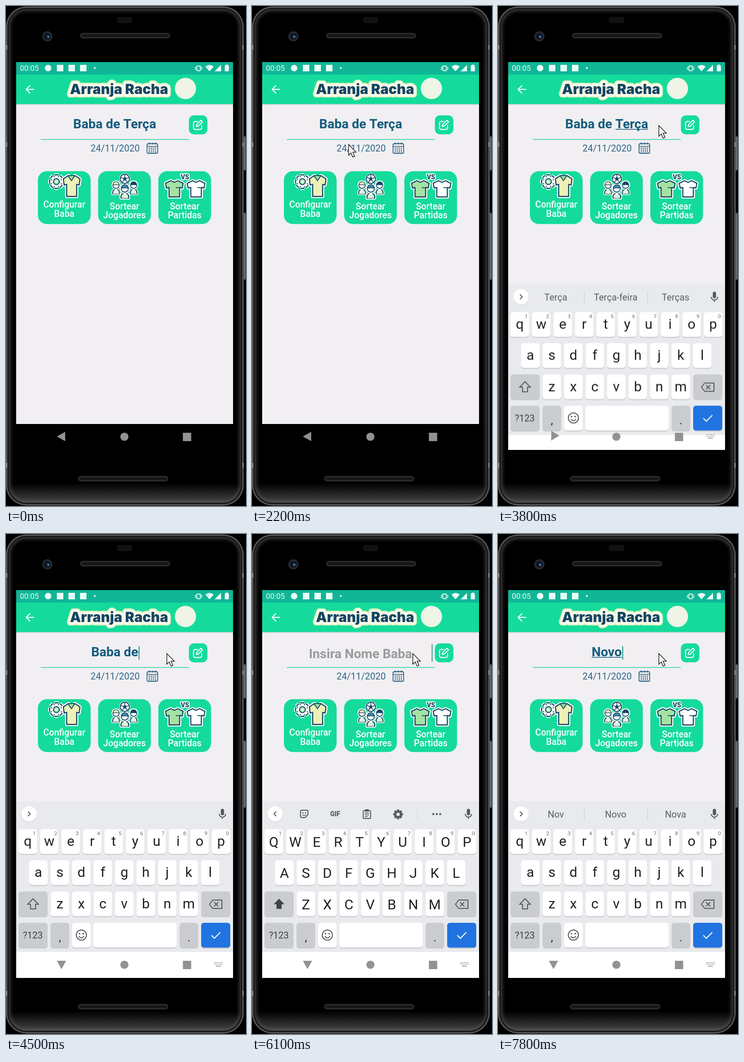
These frames come from a looping animation (519 by 1079 pixels, 8000 ms). An HTML page with a canvas:

```html
<!DOCTYPE html>
<html lang="pt">
<head>
<meta charset="utf-8">
<title>Racha</title>
<style>
html, body { margin: 0; width: 100%; height: 100%; overflow: hidden; background: #000; }
canvas { display: block; }
</style>
</head>
<body>
<canvas id="stage" width="519" height="1079"></canvas>
<script>
const W = 519, H = 1079, LOOP = 8000, STEP = 100;
const stage = document.getElementById('stage').getContext('2d');
const sheet = document.createElement('canvas');
sheet.width = W;
sheet.height = H;
const sheetCtx = sheet.getContext('2d');
let c = stage;

const GREEN = '#14db9b', NAVY = '#174664', TITLE = '#135c7c', INK = '#1f2023', ICON = '#55585c';

// Drawing helpers
function box(x, y, w, h, r, fill) {
  c.beginPath();
  c.roundRect(x, y, w, h, r);
  c.fillStyle = fill;
  c.fill();
}
function frame(x, y, w, h, r, color, width) {
  c.beginPath();
  c.roundRect(x, y, w, h, r);
  c.strokeStyle = color;
  c.lineWidth = width;
  c.stroke();
}
function disc(x, y, r, fill, edge, width) {
  c.beginPath();
  c.arc(x, y, r, 0, 7);
  if (fill) { c.fillStyle = fill; c.fill(); }
  if (edge) { c.strokeStyle = edge; c.lineWidth = width; c.stroke(); }
}
function trace(pts, closed) {
  c.beginPath();
  for (let i = 0; i < pts.length; i += 2) c.lineTo(pts[i], pts[i + 1]);
  if (closed) c.closePath();
}
function poly(pts, fill) {
  trace(pts, true);
  c.fillStyle = fill;
  c.fill();
}
function line(pts, color, width, closed) {
  trace(pts, closed);
  c.strokeStyle = color;
  c.lineWidth = width;
  c.stroke();
}
function text(s, x, y, size, color, weight = 400, align = 'center', family = 'Roboto') {
  c.font = `${weight} ${size}px ${family}, sans-serif`;
  c.textAlign = align;
  c.fillStyle = color;
  c.fillText(s, x, y);
}
function at(x, y, draw) {
  c.save();
  c.translate(x, y);
  draw();
  c.restore();
}
function fade(y0, y1, from, to) {
  const g = c.createLinearGradient(0, y0, 0, y1);
  g.addColorStop(0, from);
  g.addColorStop(1, to);
  return g;
}
const lerp = (a, b, p) => a + (b - a) * p;
const clamp = v => Math.max(0, Math.min(1, v));

// Timeline: [time, x, y] for the pointer, [time, text] for the field
const paths = [
  [[100, 236, 476], [400, 262, 330], [600, 318, 200], [700, 340, 148], [800, 385, 12],
   [900, 396, 84], [1000, 405, 75], [1100, 415, 66], [1399, 415, 66]],
  [[2100, 124, 400], [2200, 208, 298], [2300, 290, 256], [2500, 370, 243], [2900, 347, 257], [8000, 347, 257]]
];
const OLD = 'Baba de Terça';
const edits = [[0, OLD], [3300, OLD], [4100, 12], [4300, 10], [4400, 8], [4500, 7], [4600, 5], [4700, 3],
  [4800, 1], [4900, ''], [5100, ''], [6400, 'N'], [6800, 'No'], [7200, 'Nov'], [7500, 'Novo']]
  .map(([t, s]) => [t, typeof s === 'number' ? OLD.slice(0, s) : s]);
const hints = { N: ['Não', 'No', 'Na'], No: ['No', 'Nos', 'Nova'], Nov: ['Nov', 'Novo', 'Nova'] };
hints.Novo = hints.Nov;

const editAt = t => edits.filter(e => e[0] <= t).pop();

function pointerAt(t) {
  for (const path of paths) {
    for (let i = 1; i < path.length; i++) {
      const [t0, x0, y0] = path[i - 1], [t1, x1, y1] = path[i];
      if (t >= t0 && t <= t1) {
        const p = (t - t0) / (t1 - t0);
        return [lerp(x0, x1, p), lerp(y0, y1, p)];
      }
    }
  }
  return null;
}

function drawPhone() {
  c.fillStyle = '#000';
  c.fillRect(0, 0, W, H);
  for (const [y, h] of [[281, 74], [446, 145]]) {
    box(510, y, 9, h, 2, '#4b4b4b');
    box(515, y + 2, 2, h - 4, 1, '#777');
  }
  box(0, 1, 514, 1077, 44, '#565656');
  for (const y of [84, 294, 986]) {
    box(0, y, 4, 10, 0, '#8a8a8a');
    box(510, y, 4, 10, 0, '#8a8a8a');
  }
  // The rim darkens towards the glass and catches light near the bottom
  for (let i = 3; i < 18; i++) {
    const v = i < 6 ? 24 : Math.round(52 * Math.pow(1 - (i - 6) / 12, 2));
    box(i, i + 1, 514 - 2 * i, 1077 - 2 * i, 44 - i, `rgb(${v},${v},${v})`);
  }
  box(18, 19, 478, 1041, 26, '#000');
  box(8, 1030, 498, 42, [0, 0, 36, 36], fade(1030, 1072, 'rgba(90,90,90,0)', 'rgba(90,90,90,.75)'));
  box(240, 24, 33, 13, 4, '#111');
  disc(89.5, 65.5, 11, '#29292c');
  disc(89.5, 65.5, 7.5, '#0b1624');
  disc(91, 66, 3, '#24507f');
  disc(92, 67, 1.2, '#8fb3d8');
  for (const [x, y] of [[160, 58], [156, 1014]]) {
    box(x, y, 195, 12, 6, '#2b2b2b');
    box(x + 3, y + 3, 189, 6, 3, '#171717');
  }
}

function drawStatus() {
  const white = '#e9fbf6';
  box(22, 121, 469, 27, 0, '#10b696');
  text('00:05', 30, 140, 16.5, white, 400, 'left');
  disc(91, 134, 7, white);
  for (const x of [117, 142, 167]) box(x - 7, 127, 14, 14, 0, white);
  disc(192, 134, 2, white);
  frame(412.5, 129.5, 8, 10, 2, white, 2);
  line([409.5, 131, 409.5, 138], white, 1.4);
  line([423.5, 131, 423.5, 138], white, 1.4);
  c.beginPath();
  c.moveTo(440, 141);
  c.lineTo(431.5, 131);
  c.quadraticCurveTo(440, 123.5, 449, 131);
  c.fillStyle = white;
  c.fill();
  poly([465, 127, 465, 141, 451, 141], white);
  box(473, 128, 9, 13, 1.5, white);
  box(475, 126.5, 5, 3, 0.5, white);
}

function drawHeader() {
  box(22, 211, 469, 4, 0, fade(211, 215, 'rgba(0,60,40,.2)', 'rgba(0,60,40,0)'));
  box(22, 148, 469, 63.5, 0, GREEN);
  line([61, 180, 44, 180], '#fff', 2.2);
  line([52, 171.5, 43.5, 180, 52, 188.5], '#fff', 2.2);
  c.lineJoin = 'round';
  c.font = '900 30px Inter, sans-serif';
  c.textAlign = 'center';
  for (const [color, width] of [['#d9f2c3', 15], ['#fbfbea', 10]]) {
    c.strokeStyle = color;
    c.lineWidth = width;
    c.strokeText('Arranja Racha', 244.5, 190);
  }
  text('Arranja Racha', 244.5, 190, 30, NAVY, 900, 'center', 'Inter');
  disc(388, 178, 23, '#eef4e6');
}

// Shirt outline in a unit box; dip is the depth of the collar
function drawShirt(x, y, w, h, dip, fill) {
  const shape = [0, .16, .3, 0, .5, dip, .7, 0, 1, .16, .95, .45, .8, .42, .8, 1, .2, 1, .2, .42, .05, .45]
    .map((v, i) => i % 2 ? y + v * h : x + v * w);
  c.lineJoin = 'round';
  line(shape, '#fff', 7, true);
  poly(shape, fill);
  line(shape, NAVY, 2.4, true);
}

function gear(x, y, r, color, hole) {
  at(x, y, () => {
    for (let i = 0; i < 8; i++) {
      c.rotate(Math.PI / 4);
      box(-r * .24, -r, r * .48, r * .5, 1, color);
    }
  });
  disc(x, y, r * .76, color);
  disc(x, y, r * .36, hole);
}

function drawBall(x, y, r) {
  disc(x, y, r + 2, '#fff');
  disc(x, y, r, '#fff', NAVY, 2);
  at(x, y, () => {
    const pent = [];
    for (let i = 0; i < 5; i++) {
      const a = i * Math.PI * .4 - Math.PI / 2;
      pent.push(Math.cos(a) * r * .42, Math.sin(a) * r * .42);
      line([Math.cos(a) * r * .4, Math.sin(a) * r * .4, Math.cos(a) * r, Math.sin(a) * r], NAVY, 1.6);
    }
    poly(pent, NAVY);
  });
}

function drawPlayer(x, y, s, hair) {
  at(x, y, () => {
    c.scale(s, s);
    box(-12, 9, 24, 17, [10, 10, 4, 4], '#fff');
    disc(0, 0, 11.5, '#fff');
    box(-10, 11, 20, 13, [8, 8, 2, 2], NAVY);
    box(-7.5, 13, 15, 10, [6, 6, 1, 1], '#d9f2d5');
    poly([-4, 11, 4, 11, 0, 17], '#fff');
    disc(0, 1, 8, '#fff', NAVY, 2);
    c.beginPath();
    c.arc(0, 0, 8, Math.PI, 0);
    c.quadraticCurveTo(0, -1, -8, 0);
    c.fillStyle = hair;
    c.fill();
    c.strokeStyle = NAVY;
    c.lineWidth = 1.5;
    c.stroke();
  });
}

function drawButtons() {
  const labels = [['Configurar', 'Baba', 435], ['Sortear', 'Jogadores', 438.5], ['Sortear', 'Partidas', 438.5]];
  labels.forEach(([top, low, y], i) => {
    const x = 126 + i * 130.2;
    box(x - 57, 356.5, 114, 114, 19, GREEN);
    text(top, x, y, 19.3, '#fff', 500);
    text(low, x, y + 19.5, 19.3, '#fff', 500);
  });

  gear(109, 379, 18, '#fff', NAVY);
  gear(109, 379, 16, NAVY, NAVY);
  gear(109, 379, 13.5, '#fff', NAVY);
  disc(109, 379, 6.5, '#9fe0a8', NAVY, 2);
  disc(109, 379, 2.5, '#fff');
  drawShirt(124, 366, 36, 45, .1, '#eef0b8');
  poly([134, 366, 149, 366, 141.5, 376], '#9fe0a8');
  line([134, 366, 141.5, 377, 149, 366], NAVY, 2, true);

  drawPlayer(238, 386, .85, '#f0efb6');
  drawPlayer(276, 386, .85, NAVY);
  drawPlayer(257, 393, .95, '#3c8aa5');
  drawBall(257, 373, 10);

  drawShirt(345, 377, 38, 35, .1, '#a5e3a4');
  drawShirt(392, 377, 38, 35, .1, '#fff');
  for (const x of [367, 414]) line([x, 392, x + 7, 392], NAVY, 1.8);
  c.font = '900 14px Roboto, sans-serif';
  c.textAlign = 'center';
  c.strokeStyle = '#fff';
  c.lineWidth = 4;
  c.strokeText('VS', 387, 374);
  text('VS', 387, 374, 14, NAVY, 900);
}

function drawField(t) {
  const [since, value] = editAt(t);
  const focused = t >= 3300;
  const blink = focused && Math.floor((t - since) / 500) % 2 === 0;
  if (value) {
    text(value, 235, 264, 28, TITLE, 700);
    const right = 235 + c.measureText(value).width / 2;
    if (focused && (t < 4400 || t >= 6400)) {
      const word = c.measureText(value.split(' ').pop()).width;
      box(right - word, 265.5, word, 1.6, 0, TITLE);
    }
    if (blink) box(right + 1, 242, 2, 29, 0, '#159a86');
  } else {
    text('Insira Nome Baba', 234.5, 267.5, 28, '#9b9b9d', 700);
    if (blink) box(388.5, 238, 2, 38, 0, '#2b9c8e');
  }
  box(75, 287.3, 320, 1.5, 0, '#2bd0a2');
  text('24/11/2020', 236, 314, 20, '#2f6684');

  const ink = '#2f6684';
  frame(305, 297, 23, 21, 3, ink, 1.8);
  line([305, 303, 328, 303], ink, 1.6);
  for (const x of [310, 316.5, 323]) line([x, 294.5, x, 299], ink, 1.8);
  for (let i = 0; i < 12; i++) box(308.7 + i % 4 * 4.4, 305.5 + Math.floor(i / 4) * 4, 2.4, 2.4, 0, ink);

  box(395.5, 236, 40, 41, 11, GREEN);
  c.lineCap = 'round';
  line([414, 249, 408, 249, 405.5, 251.5, 405.5, 264, 408, 266.5, 420.5, 266.5, 423, 264, 423, 258], '#fff', 2);
  line([421.5, 246.5, 425, 250, 416, 259, 411.5, 260, 412.5, 255.5], '#fff', 2, true);
  c.lineCap = 'butt';
}

function drawMic() {
  box(464.5, 593, 7, 14, 3.5, ICON);
  c.beginPath();
  c.arc(468, 604, 7, 0, Math.PI);
  c.strokeStyle = ICON;
  c.lineWidth = 2;
  c.stroke();
  line([468, 611, 468, 615], ICON, 2);
}

function drawTools() {
  frame(105, 596, 16, 16, 3, ICON, 2);
  poly([122, 606, 122, 613, 115, 613], '#e8eaed');
  line([121, 606, 115, 612], ICON, 2);
  disc(110, 602, 1.5, ICON);
  disc(116, 602, 1.5, ICON);
  line([109, 606.5, 113, 608, 117, 606], ICON, 1.6);
  text('GIF', 180, 609, 14, ICON, 900);
  frame(240.5, 597, 16, 17, 2, ICON, 2);
  box(244, 594, 9, 5, 1.5, ICON);
  for (let i = 0; i < 3; i++) line([244, 602 + i * 4, i < 2 ? 253 : 250, 602 + i * 4], ICON, 1.7);
  gear(316, 605, 10.5, ICON, '#e8eaed');
  box(357, 592, 1, 25, 0, '#cfd1d5');
  for (const x of [392, 399.5, 407]) disc(x, 604.5, 2.2, ICON);
}

function key(x, y, w, fill = '#fff') {
  box(x, y + 1.5, w, 54, 6, '#c6c8cc');
  box(x, y, w, 53.5, 6, fill);
}

function drawKeyboard(t) {
  const caps = t >= 4900 && t < 6400;
  const tools = t < 6400 ? clamp((t - 4900) / 200) : 0;
  const gray = '#cacccf';
  const words = t < 4400 ? ['Terça', 'Terça-feira', 'Terças'] : hints[editAt(t)[1]];

  box(22, 577, 469, 325, 0, '#e8eaed');
  box(22, 902, 469, 177, 0, '#fff');
  disc(50, 605, 17, '#d5d7da');
  disc(50, 604, 16.5, '#fff');
  const d = tools ? -1 : 1;
  line([50 - 2.5 * d, 599, 50 + 2.5 * d, 604, 50 - 2.5 * d, 609], ICON, 2);
  drawMic();
  if (words) {
    words.forEach((s, i) => text(s, 125 + i * 129.5, 612, 20, '#5b5e62'));
    box(186, 591, 1, 28, 0, '#c9cbcf');
    box(323, 591, 1, 28, 0, '#c9cbcf');
  }
  if (tools) {
    c.globalAlpha = tools;
    drawTools();
    c.globalAlpha = 1;
  }

  const rows = [['qwertyuiop', 47, 637, 673], ['asdfghjkl', 70, 704, 740], ['zxcvbnm', 116.5, 771.5, 808]];
  rows.forEach(([letters, x0, y, base], row) => {
    [...letters].forEach((ch, i) => {
      const x = x0 + i * 46.45;
      key(x - 20, y, 40);
      text(caps ? ch.toUpperCase() : ch, x, base + (caps ? 2 : 0), 30, INK);
      if (row === 0) text((i + 1) % 10, x + 14, 650, 11.5, '#6a6c70');
    });
  });

  key(27, 771.5, 63, gray);
  const arrow = [58.5, 787, 70, 799, 64, 799, 64, 809, 53, 809, 53, 799, 47, 799];
  if (caps) poly(arrow, '#3f4246');
  else line(arrow, ICON, 2, true);
  key(422, 771.5, 63, gray);
  line([440, 799, 447, 790, 467, 790, 467, 808, 447, 808], ICON, 2, true);
  line([450, 794.5, 459, 803.5], ICON, 2);
  line([459, 794.5, 450, 803.5], ICON, 2);

  key(27, 839, 63, gray);
  text('?123', 58, 873, 20, '#3f4246');
  key(96.5, 839, 40, gray);
  text(',', 116.5, 879, 24, INK);
  key(143, 839, 40);
  disc(163, 865.5, 11, null, ICON, 2);
  disc(159, 862.5, 1.7, ICON);
  disc(167, 862.5, 1.7, ICON);
  c.beginPath();
  c.arc(163, 866, 5.5, .3, Math.PI - .3);
  c.stroke();
  key(189, 839, 180);
  key(375.5, 839, 40, gray);
  text('.', 395.5, 879, 24, INK);
  key(422, 839, 63, '#2173e0');
  line([444, 866, 450.5, 872.5, 463.5, 859.5], '#fff', 2.2);
}

function drawNav(t, rise) {
  const color = rise > 0 && rise < .5 ? '#b5b5b5' : '#929292';
  const turn = clamp((t - 3600) / 300);
  at(120, 929, () => {
    c.rotate(-Math.PI / 2 * turn);
    poly([-10, 0, 8, -10, 8, 10], color);
  });
  disc(256, 929.5, 8.8, color);
  box(382.5, 921, 18, 18, 0, color);
  if (t >= 3400) {
    for (let i = 0; i < 12; i++) box(450 + i % 6 * 3.3, 924 + Math.floor(i / 6) * 3.5, 2, 2, 0, '#a5a5a5');
    box(454, 931.5, 11, 2, 0, '#a5a5a5');
  }
}

function drawPointer(x, y) {
  at(x, y, () => {
    const arrow = [.8, 1, .8, 24, 6, 19, 10, 28, 14, 26.3, 10, 17.5, 17, 17.5];
    c.lineJoin = 'miter';
    poly(arrow, '#fff');
    line(arrow, '#222', 1.5, true);
  });
}

function slideKeyboard(t, rise) {
  c = sheetCtx;
  c.clearRect(0, 0, W, H);
  drawKeyboard(t);
  c = stage;
  c.save();
  c.beginPath();
  c.rect(22, 121, 469, 837);
  c.clip();
  c.globalAlpha = Math.min(1, rise * 1.4);
  c.drawImage(sheet, 0, 377 * Math.pow(1 - rise, 2));
  c.restore();
}

function render(t) {
  const rise = clamp((t - 3500) / 400);
  const pos = pointerAt(t);
  drawPhone();
  box(22, 121, 469, 781, 0, '#f1eff2');
  drawStatus();
  drawHeader();
  drawField(t);
  drawButtons();
  if (rise > 0) slideKeyboard(t, rise);
  drawNav(t, rise);
  if (pos) drawPointer(...pos);
}

function tick(now) {
  render(Math.floor(now % LOOP / STEP) * STEP);
  requestAnimationFrame(tick);
}
render(0);
requestAnimationFrame(tick);
</script>
</body>
</html>
```
